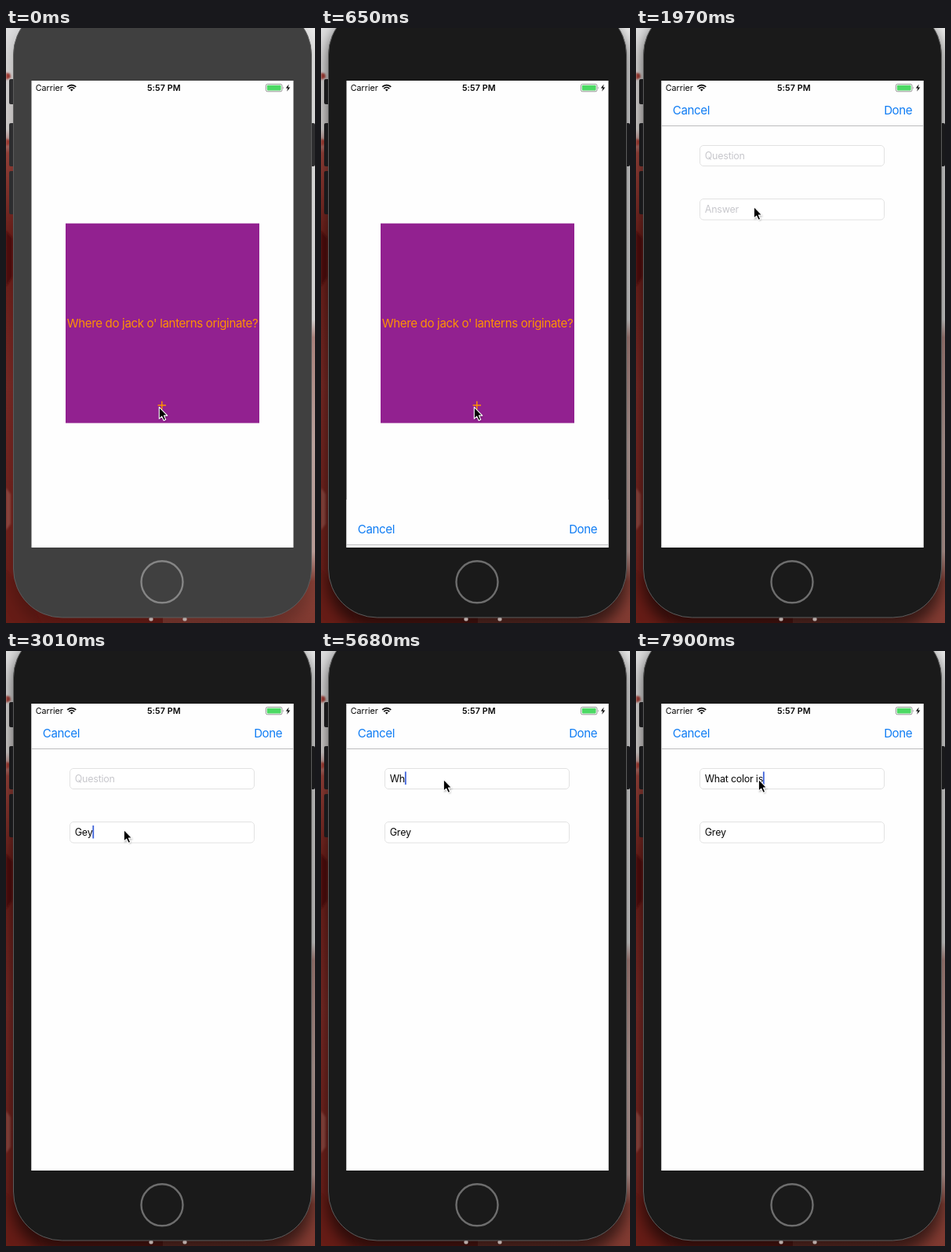
Animation of 394x757 px, one loop 8000 ms. Source, as an HTML page:

```html
<!DOCTYPE html>
<html lang="en">
<head>
<meta charset="utf-8">
<title>Flashcard form</title>
<style>
  html, body { margin: 0; width: 100%; height: 100%; overflow: hidden; background: #ddd; }
  svg { display: block; width: 100vw; height: 100vh; }
  text { font-family: Inter, Roboto, sans-serif; white-space: pre; }
  .status { font-size: 10.7px; fill: #050505; }
  .bar { font-size: 15.1px; letter-spacing: -.4px; fill: #107df4; }
  .card { font-size: 15.1px; letter-spacing: -.35px; fill: #ff9300; }
  .field { font-size: 12.46px; letter-spacing: -.22px; fill: #080808; }
  .hint { fill: #c7c7cc; }
  .box { fill: #fff; stroke: #e2e2e2; }
</style>
</head>
<body>
<svg viewBox="0 0 394 757" preserveAspectRatio="none">
  <defs>
    <linearGradient id="wallLeft" x2="0" y2="1">
      <stop offset="0" stop-color="#dededf"/>
      <stop offset=".17" stop-color="#d3cfce"/>
      <stop offset=".21" stop-color="#98423a"/>
      <stop offset=".36" stop-color="#6a1d18"/>
      <stop offset=".6" stop-color="#7a2a25"/>
      <stop offset="1" stop-color="#6b1d17"/>
    </linearGradient>
    <linearGradient id="wallRight" x2="0" y2="1">
      <stop offset="0" stop-color="#ebebeb"/>
      <stop offset=".49" stop-color="#e6e5e5"/>
      <stop offset=".52" stop-color="#b98e88"/>
      <stop offset=".7" stop-color="#cbb1ac"/>
      <stop offset=".88" stop-color="#c9aaa5"/>
      <stop offset=".93" stop-color="#8b4238"/>
      <stop offset="1" stop-color="#813a31"/>
    </linearGradient>
    <filter id="blur" x="-20%" y="-20%" width="140%" height="140%">
      <feGaussianBlur stdDeviation="9"/>
    </filter>
    <filter id="soft"><feGaussianBlur stdDeviation=".8"/></filter>
    <clipPath id="screen"><rect x="32.5" y="67" width="334" height="594"/></clipPath>
  </defs>

  <rect width="200" height="757" fill="url(#wallLeft)"/>
  <rect x="200" width="194" height="757" fill="url(#wallRight)"/>
  <g filter="url(#soft)">
    <path d="M0 57l5 1 1 5-6 3zM0 141l6 2-2 6-4 1z" fill="#a33a33"/>
    <path d="M0 258l8 9v50l-8 12z" fill="#51110e"/>
    <path d="M0 585l6 8v38l-6 8z" fill="#8f4640"/>
    <path d="M0 690l22 25 22 42H0z" fill="#661a15"/>
  </g>

  <rect id="shadow" x="8" y="-20" width="383" height="785" rx="62" filter="url(#blur)"/>
  <g fill="#b8aaa7"><circle cx="185" cy="752" r="2.6"/><circle cx="228" cy="752" r="2.6"/></g>

  <g id="keys">
    <rect x="4" y="65" width="9" height="32" rx="2"/>
    <rect x="4" y="121" width="9" height="55" rx="2"/>
    <rect x="4" y="182" width="9" height="55" rx="2"/>
    <rect x="386" y="121" width="8" height="55" rx="2"/>
  </g>
  <rect id="body" x="9.5" y="-28" width="380" height="778" rx="62" stroke="#5c5c5c"/>
  <circle id="home" cx="199" cy="704.8" r="26.5" fill="none" stroke-width="2.4"/>

  <g clip-path="url(#screen)">
    <rect x="32" y="67" width="335" height="594" fill="#fefefe"/>
    <rect x="76" y="248.6" width="247" height="254" fill="#922190"/>
    <text class="card" x="199.5" y="381" text-anchor="middle">Where do jack o' lanterns originate?</text>
    <path id="plus" d="M193.6 480h10.4M198.8 474.8v10.4" stroke="#ff9300" stroke-width="1.4"/>

    <g id="sheet">
      <rect x="32" y="67" width="335" height="594" fill="#fefefe"/>
      <rect x="32" y="124" width="335" height="1" fill="#bcbcbe"/>
      <text class="bar" x="46.8" y="110">Cancel</text>
      <text class="bar" x="352.2" y="110" text-anchor="end">Done</text>
      <rect class="box" x="81.5" y="149.5" width="235" height="26" rx="4.5"/>
      <rect class="box" x="81.5" y="217.5" width="235" height="26.5" rx="4.5"/>
      <text id="question" class="field" x="87.8" y="166.5"></text>
      <text id="answer" class="field" x="87.8" y="235"></text>
      <rect id="caret" width="1.8" height="16.5" fill="#3f63d9"/>
    </g>

    <text class="status" x="37.8" y="80">Carrier</text>
    <text class="status" x="201.3" y="80" text-anchor="middle" font-weight="600" letter-spacing=".1">5:57 PM</text>
    <g fill="none" stroke="#050505" stroke-width="1.8">
      <path d="M78.2 74.9a7.8 7.8 0 0 1 11 0M80.2 77.1a5 5 0 0 1 7 0"/>
      <path d="M83.7 80.6l-1.8-2a2.6 2.6 0 0 1 3.6 0z" fill="#050505" stroke="none"/>
    </g>
    <rect x="331.4" y="71.4" width="20.6" height="9.4" rx="2" fill="none" stroke="#8d8d8d" stroke-width=".9"/>
    <rect x="332.8" y="72.8" width="17.8" height="6.6" rx=".8" fill="#4cd964"/>
    <path d="M353 74.4q1.6 1.7 0 3.4z" fill="#8d8d8d"/>
    <path d="M360.8 71.6l-4 5h2.6l-1.2 4.2 4.1-5.2h-2.7z" fill="#050505"/>
  </g>

  <g id="pointer">
    <path d="M1 2V17L5 14L7.4 18.5L9.6 17.4L7.4 13H12z" fill="#000" opacity=".3" filter="url(#soft)"/>
    <path d="M.3 .3V15.2L3.7 12.2L6.2 17.4L8.7 16.2L6.4 11.1H10.8z" fill="#000" stroke="#fff" stroke-width="1.1" stroke-linejoin="round"/>
  </g>
</svg>

<script>
const LOOP = 8000, SLIDE_START = 620, SLIDE_END = 1090;
const $ = id => document.getElementById(id);
const set = (id, attrs) => {
  for (const name in attrs) $(id).setAttribute(name, attrs[name]);
};

// [start, value]: each value holds until the next start
const path = [[0, [195, 482]], [800, [192, 448]], [950, [182, 325]], [1090, [171, 248]],
  [1230, [160, 233]], [1380, [152, 228]], [1520, [150, 227]],
  [4650, [154, 158]], [4800, [155, 131]], [4940, [156, 150]], [5090, [156, 163]]];
const answers = [[0, ''], [2570, 'G'], [2860, 'Ge'], [3010, 'Gey'], [3610, 'Ge'],
  [3910, 'G'], [4060, 'Gre'], [4200, 'Grey']];
const questions = [[0, ''], [5680, 'Wh'], [5830, 'Wha'], [6130, 'Whar'], [6430, 'Wha'],
  [6570, 'What'], [6870, 'What '], [7020, 'What c'], [7160, 'What co'], [7310, 'What col'],
  [7460, 'What color'], [7600, 'What color '], [7750, 'What color i'], [7900, 'What color is']];
const focus = [[0, ''], [1520, 'answer'], [1970, ''], [2420, 'answer'],
  [3460, ''], [3610, 'answer'], [4940, ''], [5090, 'question']];
const slideTicks = [[0, 0], [650, 650], [800, 800], [950, 950], [1090, 1090]];

const at = (cues, t) => cues.findLast(cue => cue[0] <= t)[1];

// Critically damped spring, from the bottom of the screen to its top
function sheetOffset(t) {
  if (t < SLIDE_START) return 594;
  if (t >= SLIDE_END) return 0;
  const s = (t - SLIDE_START) * .018;
  return 594 * (1 + s) * Math.exp(-s);
}

function fill(id, value, hint) {
  const el = $(id);
  const shown = value || hint;
  if (el.textContent !== shown) el.textContent = shown;
  el.classList.toggle('hint', !value);
  return value ? el.getComputedTextLength() : 0;
}

function draw(t) {
  const active = t >= 500;
  set('body', { fill: active ? '#1a1a1a' : '#404040' });
  set('keys', { fill: active ? '#19191b' : '#2d2d2f' });
  set('home', { stroke: active ? '#6d6d6d' : '#858585' });
  set('shadow', { opacity: active ? .58 : .2 });
  set('plus', { opacity: active && t < 650 ? .22 : 1 });
  set('sheet', { transform: `translate(0 ${sheetOffset(at(slideTicks, t))})` });

  const widths = {
    question: fill('question', at(questions, t), 'Question'),
    answer: fill('answer', at(answers, t), 'Answer')
  };
  const field = at(focus, t);
  set('caret', {
    x: 87.7 + (widths[field] || 0),
    y: field === 'question' ? 153.5 : 222,
    opacity: field ? 1 : 0
  });
  set('pointer', { transform: `translate(${at(path, t)})` });
}

const start = performance.now();
function tick() {
  draw((performance.now() - start) % LOOP);
  requestAnimationFrame(tick);
}
tick();
</script>
</body>
</html>
```
